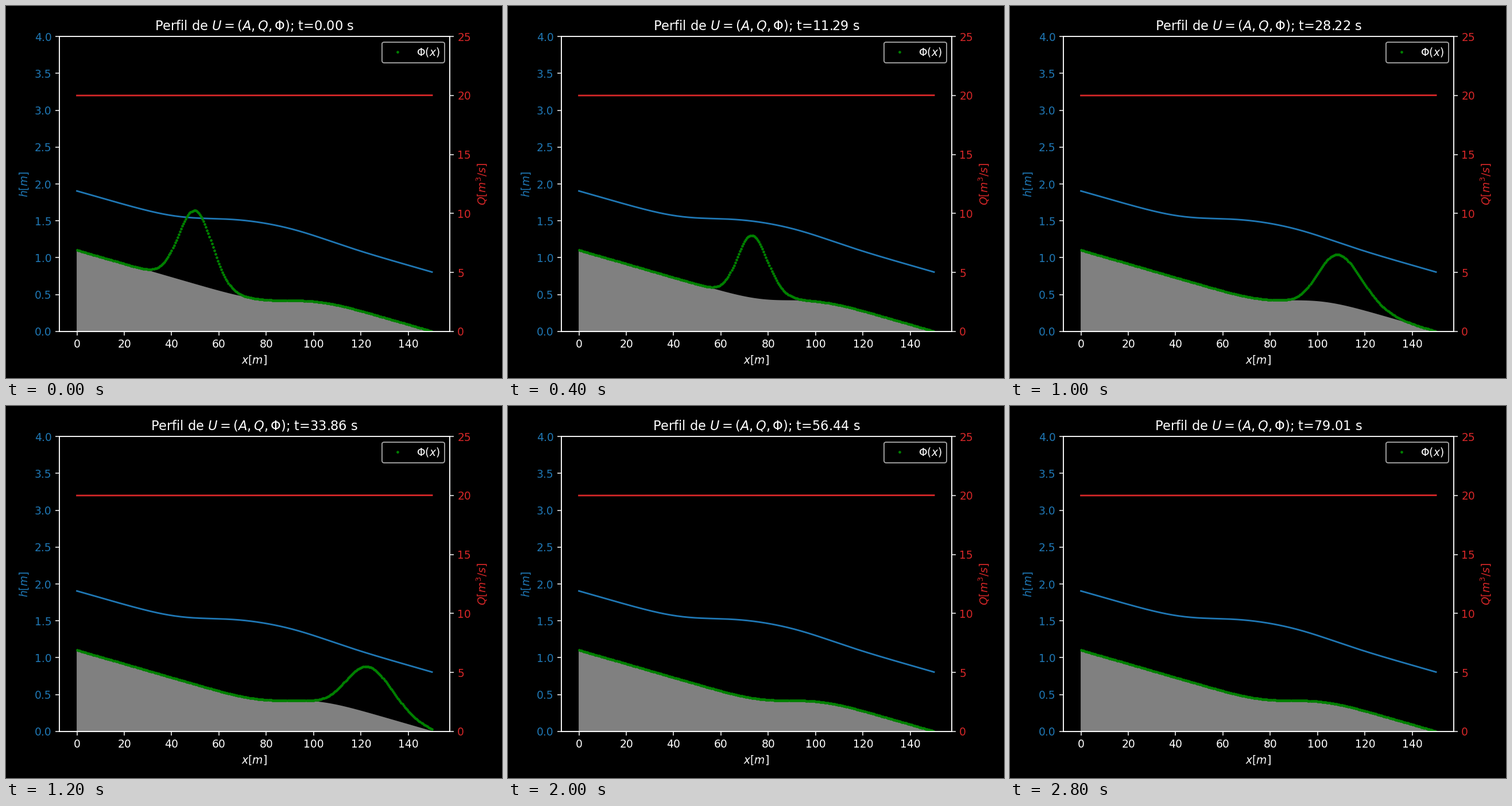
Animation of 864 by 648 pixels, one loop 3000 ms. Source, as a matplotlib script:

```python
import math

import matplotlib.pyplot as plt
import numpy as np
from matplotlib.animation import FuncAnimation

W, H, DPI = 864, 648, 135
FRAMES, INTERVAL = 15, 200
STEP = 5.6437          # simulated seconds per frame
SPEED, X0 = 2.016, 50  # stream speed at unit depth, start of the pulse


def step(x, center, width):
    """Smooth rise from 0 to 1."""
    z = (x - center) / (width * math.sqrt(2))
    return (1 + np.vectorize(math.erf)(z)) / 2


x = np.linspace(0, 150, 301)
bed = 1.103 - 0.0093 * x + 0.292 * step(x, 89.3, 12.8)
level = (1.905 - 0.0092 * x + 0.28 * step(x, 56, 14)
         + 0.041 * np.exp(-((x - 93) / 20)**2))

# Travel time along the channel; shallow water runs faster
slowness = (level - bed)**1.19 / SPEED
mean = (slowness[1:] + slowness[:-1]) / 2
travel = np.concatenate(([0], np.cumsum(mean * np.diff(x))))


def pulse(t):
    """Gaussian carried by the stream, spreading and decaying."""
    foot = np.interp(travel - t, travel, x)
    spread = 1 + 0.014 * t
    peak = np.exp(-0.008 * t) / np.sqrt(spread)
    return peak * np.exp(-(foot - X0)**2 / (100 * spread))


plt.style.use("dark_background")
fig, ax = plt.subplots(figsize=(W / DPI, H / DPI), dpi=DPI)
fig.subplots_adjust(left=92.6 / W, right=773 / W,
                    bottom=1 - 566.8 / H, top=1 - 53.2 / H)

ax.set_xlabel("$x[m]$")
ax.set_ylabel("$h[m]$", color="tab:blue")
ax.tick_params(axis="y", labelcolor="tab:blue")
ax.fill_between(x, bed, color="grey")
ax.plot(x, level, color="tab:blue")
dots, = ax.plot(x, bed, ".", ms=3, color="green", label=r"$\Phi(x)$")
ax.set_ylim(0, 4)
ax.legend(loc="upper right")

ax2 = ax.twinx()
ax2.set_ylabel("$Q[m^3/s]$", color="tab:red")
ax2.tick_params(axis="y", labelcolor="tab:red")
ax2.plot(x, np.linspace(20, 20.02, x.size), color="tab:red")
ax2.set_ylim(0, 25)

title = ax.set_title("")


def draw(k):
    t = k * STEP
    dots.set_ydata(bed + pulse(t))
    title.set_text(rf"Perfil de $U=(A,Q,\Phi)$; t={t:.2f} s")
    return dots, title


anim = FuncAnimation(fig, draw, frames=FRAMES, interval=INTERVAL, repeat=True)
plt.show()
```
